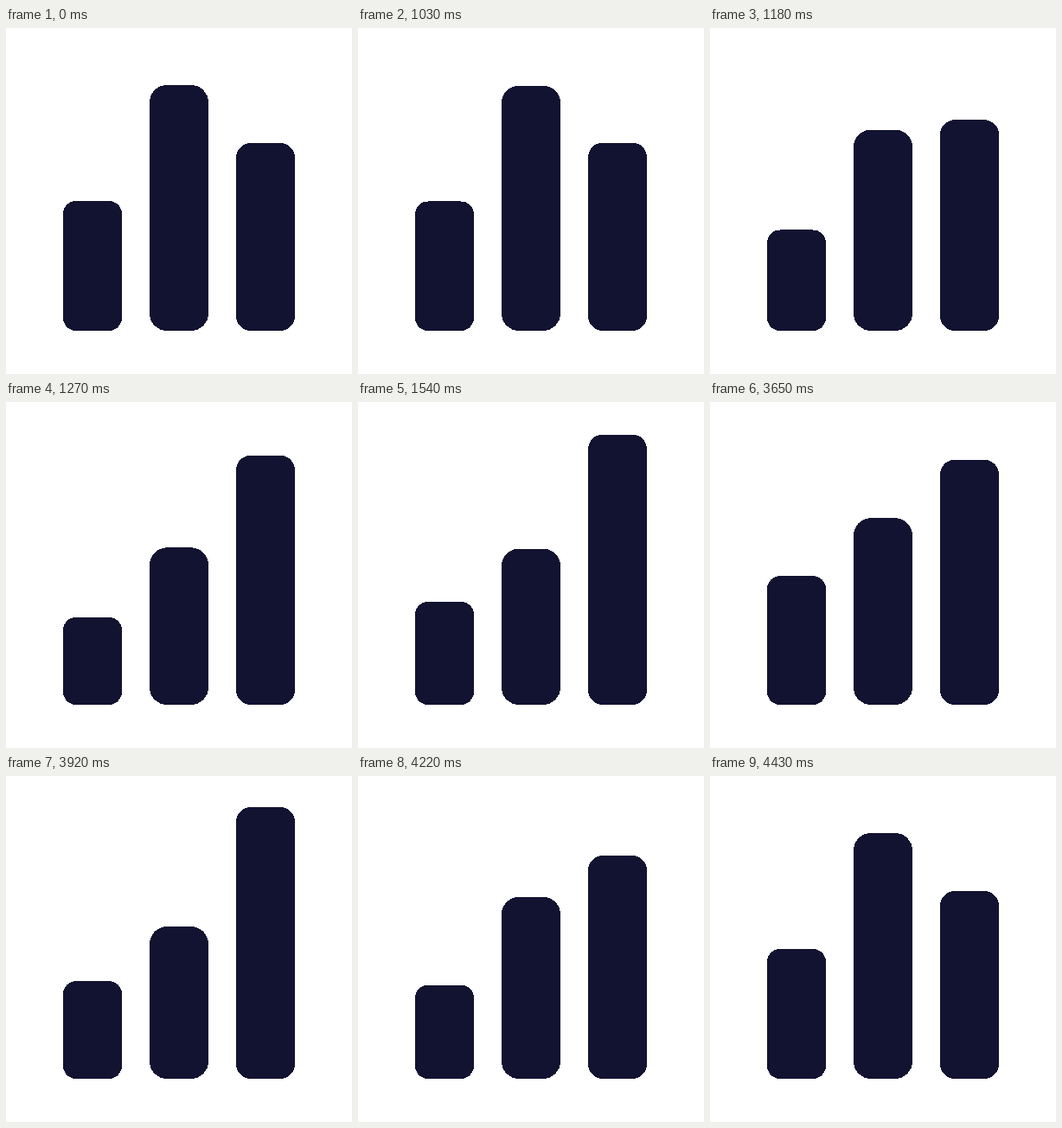
Write an HTML page that moves like this. It is 400x400 px and loops after 4460 ms.

```html
<!DOCTYPE html>
<html lang="en">
<head>
<meta charset="utf-8">
<title>Bar chart</title>
<style>
  html, body { margin: 0; width: 100%; height: 100%; overflow: hidden; background: #fff; }
  svg { display: block; width: 100%; height: 100%; fill: #121331; shape-rendering: crispEdges; }
</style>
</head>
<body>
<svg viewBox="0 0 400 400"></svg>
<script>
const LOOP = 4460, STEP = 30, STEPS = 27, BASE = 350;

// Each top edge goes from start to peak (reached at step turn), then settles at end.
const bars = [
  { x: 66, radius: 15, start: 200, peak: 250, end: 201, turn: 10.5 },
  { x: 166, radius: 20, start: 66, peak: 180.6, end: 134, turn: 12.5 },
  { x: 266, radius: 17, start: 133, peak: 35, end: 67, turn: 15 }
];

const svg = document.querySelector('svg');
for (const bar of bars) {
  bar.rect = document.createElementNS(svg.namespaceURI, 'rect');
  const attributes = { x: bar.x, width: 68, rx: bar.radius, ry: bar.radius };
  for (const name in attributes) bar.rect.setAttribute(name, attributes[name]);
  svg.append(bar.rect);
}

// cubic-bezier(.6, 0, .4, 1), solved by bisection
function ease(x) {
  let low = 0, high = 1;
  for (let i = 0; i < 24; i++) {
    const mid = (low + high) / 2;
    if (1.8 * mid - 2.4 * mid ** 2 + 1.6 * mid ** 3 < x) low = mid;
    else high = mid;
  }
  return 3 * low ** 2 - 2 * low ** 3;
}

const mix = (from, to, amount) => from + (to - from) * amount;

const stepsSince = (time, begin) =>
  Math.max(0, Math.min(STEPS, Math.floor((time - begin) / STEP)));

function topAt({ start, peak, end, turn }, step) {
  return step < turn
    ? mix(start, peak, ease(step / turn))
    : mix(peak, end, ease((step - turn) / (STEPS - turn)));
}

function draw() {
  const time = performance.now() % LOOP;
  // The way back replays the same steps in reverse.
  const step = stepsSince(time, 1000) - stepsSince(time, 3620);
  for (const bar of bars) {
    const top = topAt(bar, step);
    bar.rect.setAttribute('y', top);
    bar.rect.setAttribute('height', BASE - top);
  }
  requestAnimationFrame(draw);
}
draw();
</script>
</body>
</html>
```
